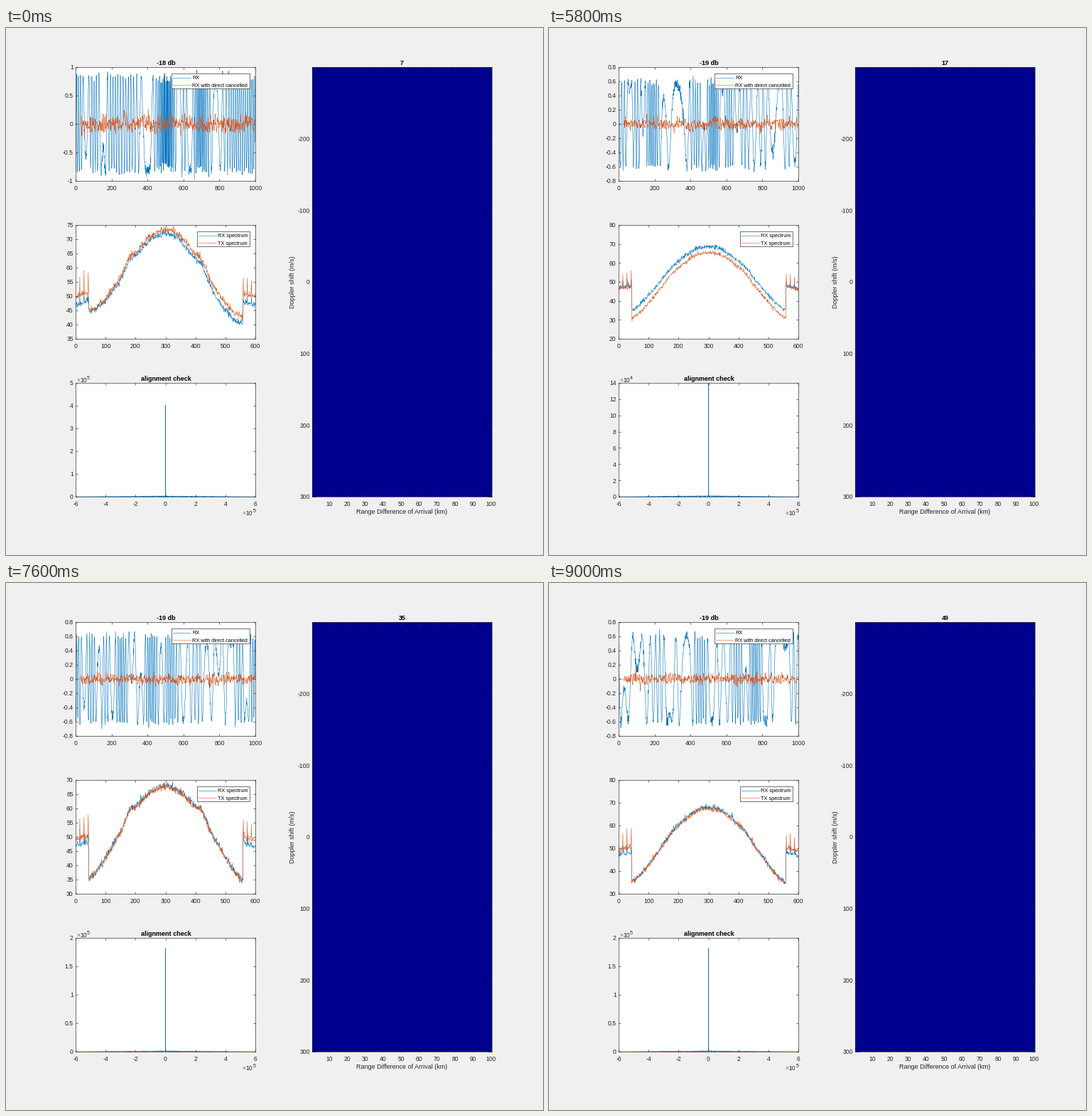
These frames come from a looping animation (756x741 px, 9200 ms). A matplotlib script:

```python
import numpy as np
import matplotlib.pyplot as plt
from matplotlib.animation import FuncAnimation
from matplotlib.patches import Rectangle

W, H, DPI = 756, 741, 100
PX = 72 / DPI
BLUE, ORANGE, INK = "#0072BD", "#D95319", "#262626"
FRAMES, INTERVAL, HOLD = 46, 200, 25
CURVE_WIDTH, EDGE_WIDTH = .55 * PX, .65 * PX

plt.rcParams["font.family"] = "Liberation Sans"

# One letter per measurement: first, second, low and high transmit level.
SEQUENCE = "FSLSHLHLHLHLHLHLHHLHLH"

# rx and tx: spectrum level at the left edge, the centre and the right edge.
KINDS = {
    "F": dict(db=-18, top=(1, .5), amp=.83, depth=.2, residue=.08,
              spec=(35, 75, 5), rx=(44.7, 72, 40.3), tx=(45.3, 73.4, 43),
              steep=1.8, shoulder=2.3, rail=3, align=(5, 1, 5), peak=4.02),
    "S": dict(db=-20, top=(1, .5), amp=.67, depth=.07, residue=.045,
              spec=(35, 75, 5), rx=(37, 70, 36.8), tx=(42.5, 72.3, 41),
              steep=1.72, shoulder=5, rail=3.3, align=(2.5, .5, 5), peak=2.03),
    "L": dict(db=-19, top=(.8, .2), amp=.6, depth=.14, residue=.045,
              spec=(20, 80, 10), rx=(35.3, 68.6, 35), tx=(31, 65.5, 31),
              steep=1.35, shoulder=.8, rail=-.4, align=(14, 2, 4), peak=14),
    "H": dict(db=-19, top=(.8, .2), amp=.6, depth=.11, residue=.04,
              spec=(30, 80, 10), rx=(35.5, 68, 35), tx=(35.2, 67.4, 34.8),
              steep=1.35, shoulder=.8, rail=2.2, align=(2, .5, 5), peak=1.82),
}
# Measurements whose axes scale differently.
RESCALED = {
    9: dict(spec=(30, 80, 10), align=(15, 5, 4), shoulder=2.5),
    14: dict(spec=(30, 70, 5), shoulder=2.5),
    17: dict(spec=(30, 70, 5)),
}

fig = plt.figure(figsize=(W / DPI, H / DPI), dpi=DPI, facecolor="#F0F0F0")


def panel(x0, y0, x1, y1, xlim, xticks, tick_len, color="white"):
    ax = fig.add_axes([x0 / W, 1 - y1 / H, (x1 - x0) / W, (y1 - y0) / H], facecolor=color)
    ax.set_xlim(*xlim)
    ax.set_xticks(xticks, [f"{t:g}" for t in xticks])
    ax.tick_params(direction="in", top=True, right=True, length=tick_len * PX,
                   width=EDGE_WIDTH, color=INK, labelcolor=INK, labelsize=8.7 * PX)
    ax.tick_params(axis="x", pad=5.6 * PX)
    ax.tick_params(axis="y", pad=3.3 * PX)
    ax.set_axisbelow(False)
    for spine in ax.spines.values():
        spine.set(linewidth=EDGE_WIDTH, color=INK)
    return ax


def curve(ax, color):
    return ax.plot([], [], color=color, lw=CURVE_WIDTH)[0]


def set_y(ax, low, high, step):
    ticks = np.round(np.arange(low, high + step / 2, step), 6) + 0.0
    ax.set_ylim(low, high)
    ax.set_yticks(ticks, [f"{t:g}" for t in ticks])


signal_ax = panel(98, 55, 351, 215, (0, 1000), range(0, 1001, 200), 2.6)
spec_ax = panel(98, 277, 351, 437, (0, 600), range(0, 601, 100), 2.6)
align_ax = panel(98, 499, 351, 659, (-6, 6), range(-6, 7, 2), 2.6)
map_ax = panel(431, 55, 684, 659, (.5, 100.5), range(10, 101, 10), 6, "#00008F")
map_ax.set_ylim(300, -300)
map_ticks = range(-200, 301, 100)
map_ax.set_yticks(map_ticks, [str(t) for t in map_ticks])

rx_line, residue_line = curve(signal_ax, BLUE), curve(signal_ax, ORANGE)
rx_spec, tx_spec = curve(spec_ax, BLUE), curve(spec_ax, ORANGE)
align_line = curve(align_ax, BLUE)
echoes = map_ax.scatter([], [], marker="s", linewidths=0)

stage = fig.add_axes([0, 0, 1, 1], zorder=5)
stage.set(xlim=(0, W), ylim=(H, 0))
stage.axis("off")


def label(x, y, text, size=9, color="black", **kw):
    return stage.text(x, y, text, size=size * PX, color=color, va="baseline", **kw)


def legend(x0, y0, x1, y1, names):
    stage.add_patch(Rectangle((x0, y0), x1 - x0, y1 - y0, fc="white", ec=INK, lw=EDGE_WIDTH))
    for i, (name, color) in enumerate(zip(names, (BLUE, ORANGE))):
        y = y0 + 5.6 + 10.2 * i
        stage.plot([x0 + 2, x0 + 27], [y, y], color=color, lw=CURVE_WIDTH)
        label(x0 + 29, y + 2.9, name, 7.4)


def exponent(x, y, power):
    label(x, y, "×", 8.7, "#707070")
    label(x + 5, y, "10", 8.7, INK)
    return label(x + 14.8, y - 4, str(power), 7, INK)


legend(233, 64, 343, 85, ("RX", "RX with direct cancelled"))
legend(269, 286, 343, 307, ("RX spectrum", "TX spectrum"))
bold = dict(ha="center", weight="bold")
db_title = label(225, 51.5, "", **bold)
count_title = label(557.5, 51.5, "", **bold)
label(225, 495.5, "alignment check", **bold)
label(557.5, 683, "Range Difference of Arrival (km)", color=INK, ha="center")
label(406, 357, "Doppler shift (m/s)", color=INK, ha="center",
      rotation=90, rotation_mode="anchor")
align_power = exponent(99, 498, 5)
exponent(332.5, 685, 5)


def signals(cfg, rng):
    """A frequency modulated carrier and what is left after cancelling it."""
    n = np.arange(1000)
    sweep = sum(rng.normal() * np.sin(2 * np.pi * (c * n / n.size + rng.random()))
                for c in range(1, 8))
    phase = np.cumsum(cfg["depth"] * sweep / np.abs(sweep).max()) + rng.random()
    rx = cfg["amp"] * (np.cos(2 * np.pi * phase) + rng.normal(0, .06, n.size))
    residue = cfg["residue"] * np.convolve(rng.normal(0, 1, n.size), [.4, .75, .4], "same")
    residue[:30] = 0
    return n, rx, residue


def spectrum(levels, cfg, rail, spike, rng):
    """Dome with soft shoulders between two flat, spiky rails."""
    left, peak, right = levels
    x = np.arange(601)
    rise = np.sin(np.pi * np.clip((x - 44) / 514, 0, 1)) ** cfg["steep"]
    floor = np.where(x < 300, left, right)
    y = floor + (peak - floor) * rise
    y += cfg["shoulder"] * np.exp(-((np.abs(x - 301) - 121) / 18) ** 2)
    outside = np.abs(x - 301) > 257
    y = np.where(outside, rail + 46.8 + 1.2 * np.sin(x / 27), y)
    y += rng.normal(0, .55, x.size) + .35 * rng.exponential(1, x.size) - .35
    y[[14, 28, 42]] += spike
    y[[560, 573, 587]] += .75 * spike
    return x, y


def alignment(cfg, rng):
    x = np.linspace(-6, 6, 1201)
    y = .009 * cfg["peak"] * np.clip(1 - np.abs(x) / 5.6, 0, 1) * rng.uniform(.2, 1, x.size)
    y[600] = cfg["peak"]
    return x, y


def draw(frame):
    k = max(0, frame - HOLD + 1)
    cfg = {**KINDS[SEQUENCE[k]], **RESCALED.get(k, {})}
    rng = np.random.default_rng(40 + k)

    db_title.set_text(f"{cfg['db']} db")
    count_title.set_text(str(7 + 2 * k))

    n, rx, residue = signals(cfg, rng)
    rx_line.set_data(n, rx)
    residue_line.set_data(n, residue)
    limit, step = cfg["top"]
    set_y(signal_ax, -limit, limit, step)

    rx_spec.set_data(*spectrum(cfg["rx"], cfg, 0, 3, rng))
    tx_spec.set_data(*spectrum(cfg["tx"], cfg, cfg["rail"], 7.5, rng))
    set_y(spec_ax, *cfg["spec"])

    high, step, power = cfg["align"]
    align_line.set_data(*alignment(cfg, rng))
    set_y(align_ax, 0, high, step)
    align_power.set_text(str(power))

    count = rng.integers(1, 4)
    echoes.set_offsets(np.column_stack([rng.uniform(5, 98, count), rng.uniform(-290, 290, count)]))
    echoes.set_sizes(np.full(count, (2 * PX) ** 2))
    echoes.set_facecolor([(0, 0, level) for level in rng.uniform(.58, .7, count)])


anim = FuncAnimation(fig, draw, frames=FRAMES, init_func=lambda: draw(0),
                     interval=INTERVAL, repeat=True, repeat_delay=0, blit=False)
plt.show()
```
